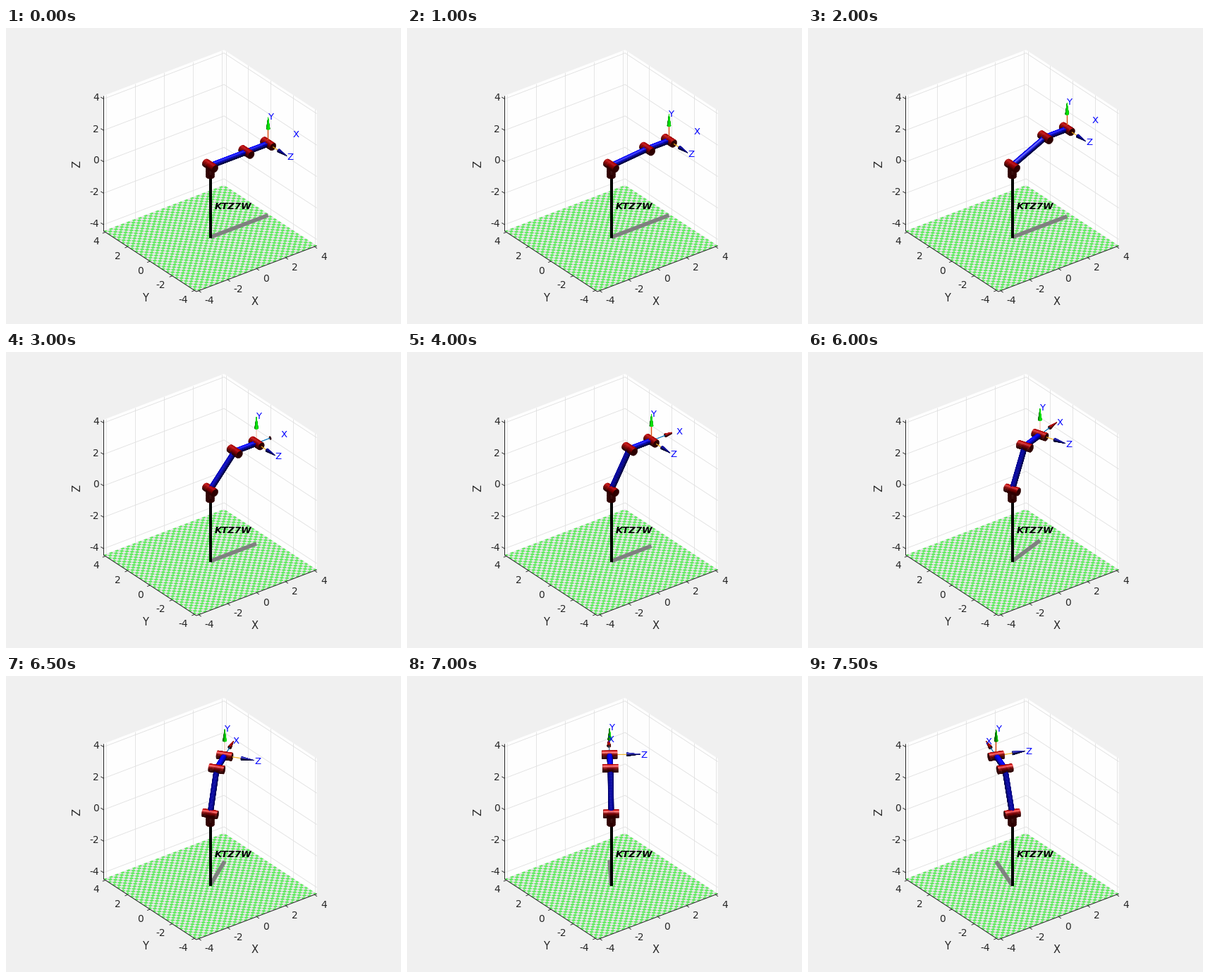
A matplotlib script that plays this animation: 560x420 px, repeating every 8000 ms.

```python
import numpy as np
import matplotlib.pyplot as plt
from matplotlib.animation import FuncAnimation
from matplotlib.collections import PolyCollection

W, H, DPI = 560, 420, 100
FRAMES, INTERVAL, STEPS = 16, 500, 9
LIM = 4.16                      # half width of the plot box
UPPER, FORE = 2.5, 1.5
TIP, TAG, CONE = 1.67, 1.75, 0.72
RED, BLUE, GREEN, NAVY = (0.7, 0, 0), (0, 0, 1), (0, 1, 0), (0, 0, 0.6)
VIEW = np.array([-0.527, -0.687, 0.5])
HALF = np.array([-0.304, -0.397, 0.866])
UP = np.array([0.0, 0.0, 1.0])

plt.rcParams["font.family"] = "DejaVu Sans"
fig = plt.figure(figsize=(W / DPI, H / DPI), dpi=DPI, facecolor="#f0f0f0")
ax = fig.add_axes([0, 0, 1, 1])
ax.set_xlim(0.5, W + 0.5)
ax.set_ylim(H + 0.5, 0.5)
ax.axis("off")


def pt(px):
    return px * 72 / DPI


def project(p, y0=196.0):
    """World point, measured from the shoulder, to stage pixels."""
    p = np.asarray(p, float)
    x, y, z = p[..., 0], p[..., 1], p[..., 2]
    return np.stack([290 + 20.53 * x - 15.8 * y,
                     y0 - 7.82 * x - 10.34 * y - 22.3 * z], -1)


def floor(x, y, z=0.0):
    return project([x, y, z], 299.0)


def line(a, b, color, px, z):
    ax.plot([a[0], b[0]], [a[1], b[1]], color=color, lw=pt(px), zorder=z,
            solid_capstyle="butt")


def label(x, y, s, px=13.9, color="#262626", ha="center", **kw):
    return ax.text(x, y + 0.365 * px, s, fontsize=pt(px), color=color, ha=ha,
                   va="baseline", zorder=20, **kw)


# ---------- static scene ----------

def draw_box():
    top = 192 / 22.3
    for a, b in (((-LIM, LIM), (LIM, LIM)), ((LIM, LIM), (LIM, -LIM))):
        wall = [floor(*a), floor(*b), floor(*b, top), floor(*a, top)]
        ax.fill(*np.transpose(wall), color="#fefefe", lw=0, zorder=1)

    grid, ink = "#dfdfdf", "#262626"
    for v in range(-4, 5, 2):
        h = v + 4 + 9 / 22.3
        line(floor(v, LIM), floor(v, LIM, top), grid, 0.8, 2)
        line(floor(LIM, v), floor(LIM, v, top), grid, 0.8, 2)
        line(floor(-LIM, LIM, h), floor(LIM, LIM, h), grid, 0.8, 2)
        line(floor(LIM, LIM, h), floor(LIM, -LIM, h), grid, 0.8, 2)

        zx, zy = floor(-LIM, LIM, h)
        line((zx, zy), (zx - 4, zy - 2.5), ink, 0.9, 5)
        label(zx - 6.5, zy - 2.4, str(v), ha="right")
        xx, xy = floor(v, -LIM)
        line((xx, xy), (xx + 3.6, xy + 2.4), ink, 0.9, 5)
        label(xx + 8.5, xy + 13.2, str(v), ha="left")
        yx, yy = floor(-LIM, v)
        line((yx, yy), (yx - 4, yy + 1.6), ink, 0.9, 5)
        label(yx - 9.3, yy + 12.5, str(v), ha="right")

    corner = floor(-LIM, LIM)
    line(corner, floor(-LIM, LIM, top), ink, 1, 5)
    line(corner, floor(-LIM, -LIM), ink, 1, 5)
    line(floor(-LIM, -LIM), floor(LIM, -LIM), ink, 1, 5)
    label(353, 388, "X", 14.8)
    label(198, 383.5, "Y", 14.8)
    ax.text(101.5, 193.5, "Z", fontsize=pt(14.8), color=ink, rotation=90,
            ha="center", va="center", zorder=20)


def quad(x0, x1, y0, y1):
    return [floor(x0, y0), floor(x1, y0), floor(x1, y1), floor(x0, y1)]


def draw_tiles(size=0.2):
    ax.fill(*np.transpose(quad(-LIM, LIM, -LIM, LIM)), color="#ece6ec", lw=0,
            zorder=3)
    n = 42
    edge = np.clip((np.arange(n + 1) - n / 2) * size, -LIM, LIM)
    tiles = [quad(edge[i], edge[i + 1], edge[j], edge[j + 1])
             for i in range(n) for j in range(n) if (i + j) % 2]
    ax.add_collection(PolyCollection(tiles, facecolors="#60ec60",
                                     edgecolors="none", zorder=4))


draw_box()
draw_tiles()
line((290.5, 208), (290.5, 298), "black", 4, 8)
label(296.5, 252.5, "KTZ7W", 13.3, "black", "left", weight="bold",
      style="oblique")
shadow, = ax.plot([], [], color="#808080", lw=pt(5.6), zorder=7,
                  solid_capstyle="butt")
body = PolyCollection([], zorder=10, linewidths=0.3)
ax.add_collection(body)
tags = [label(0, 0, s, 13.3, "blue", "left") for s in "XYZ"]


# ---------- solids ----------

def shade(color, n):
    glow = 0.5 * max(n @ HALF, 0) ** 20
    lit = 0.25 + 0.75 * max(n[2], 0)
    return tuple(np.clip(np.array(color) * lit + glow, 0, 1))


def basis(axis):
    side = np.cross(axis, UP if abs(axis[2]) < 0.9 else [1.0, 0, 0])
    side /= np.linalg.norm(side)
    return side, np.cross(axis, side)


def solid(faces, a, b, r0, r1, color, cuts=1, paint=shade, clip=False,
          sides=28):
    """Add the visible faces of a cylinder or cone running from a to b."""
    a, b = np.asarray(a, float), np.asarray(b, float)
    axis = (b - a) / np.linalg.norm(b - a)
    u, v = basis(axis)
    ang = np.linspace(0, 2 * np.pi, sides + 1)
    ring = np.outer(np.cos(ang), u) + np.outer(np.sin(ang), v)
    t = np.linspace(0, 1, cuts + 1)
    rows = [a + (b - a) * k + ring * (r0 + (r1 - r0) * k) for k in t]

    def add(pts, color):
        mid = pts.mean(0)
        if not clip or mid[:2].max() < LIM:
            faces.append((mid @ VIEW, project(pts), color))

    for lo, hi in zip(rows, rows[1:]):
        for i in range(sides):
            n = ring[i] + ring[i + 1]
            n /= np.linalg.norm(n)
            if n @ VIEW > -0.08:
                add(np.array([lo[i], lo[i + 1], hi[i + 1], hi[i]]),
                    paint(color, n))
    for row, n, r in ((rows[0], -axis, r0), (rows[-1], axis, r1)):
        if r > 0 and n @ VIEW > 0:
            add(row[:-1], paint(color, n))


def joint(faces, center, axis):
    solid(faces, center - 0.42 * axis, center + 0.42 * axis, 0.222, 0.222,
          RED, cuts=4)


def thread(faces, a, b, color, cuts=24):
    """Thin axis line, split up so that it sorts with the solids."""
    pts = a + np.outer(np.linspace(0, 1, cuts + 1), b - a)
    flat = project(pts)
    d = flat[-1] - flat[0]
    off = np.array([-d[1], d[0]]) / np.hypot(*d) * 0.3
    for i in range(cuts):
        mid = (pts[i] + pts[i + 1]) / 2
        if mid[:2].max() < LIM:
            p, q = flat[i], flat[i + 1]
            faces.append((mid @ VIEW,
                          np.array([p + off, q + off, q - off, p - off]),
                          color))


# ---------- motion ----------

def quintic(u):
    u = min(max(u, 0.0), 1.0)
    return u ** 3 * (10 - 15 * u + 6 * u * u)


def update(k):
    lift = np.radians(60) * quintic(k / STEPS)
    yaw = np.radians(90) * quintic((k - STEPS) / STEPS)
    ahead = np.array([np.cos(yaw), np.sin(yaw), 0])
    hinge = np.array([np.sin(yaw), -np.cos(yaw), 0])
    shoulder = np.zeros(3)
    elbow = UPPER * (np.cos(lift) * ahead + np.sin(lift) * UP)
    wrist = elbow + FORE * ahead

    faces = []
    solid(faces, -0.7 * UP, 0 * UP, 0.22, 0.22, RED, cuts=4)
    solid(faces, shoulder, elbow, 0.145, 0.145, BLUE, cuts=16)
    solid(faces, elbow, wrist, 0.145, 0.145, BLUE, cuts=10)
    for p in (shoulder, elbow, wrist):
        joint(faces, p, hinge)

    turn = yaw - np.radians(110)
    glint = np.array([np.cos(turn), np.sin(turn), 0])

    def leaf(color, n):
        return tuple(np.array(color) * (0.42 + 0.5 * max(n @ glint, 0)))

    arrows = ((ahead, RED, "#0072bd", shade),
              (UP, GREEN, "#d95319", leaf),
              (hinge, NAVY, "#edb120", shade))
    for (d, color, thin, paint), tag in zip(arrows, tags):
        tip, neck = wrist + TIP * d, wrist + (TIP - CONE) * d
        thread(faces, wrist, neck, thin)
        solid(faces, neck, tip, 0.1, 0.0, color, 8, paint, True, 16)
        x, y = project(wrist + TAG * d)
        tag.set_position((x - 1, y + 0.365 * 13.3))

    faces.sort(key=lambda f: f[0])
    body.set_verts([f[1] for f in faces])
    colors = [f[2] for f in faces]
    body.set_facecolor(colors)
    body.set_edgecolor(colors)

    ground = wrist * [1, 1, 0]
    shadow.set_data(*np.transpose([project(0 * ground, 297.4),
                                   project(ground, 297.4)]))
    return [body, shadow, *tags]


anim = FuncAnimation(fig, update, frames=FRAMES, interval=INTERVAL,
                     repeat=True, repeat_delay=0, blit=False)
plt.show()
```
